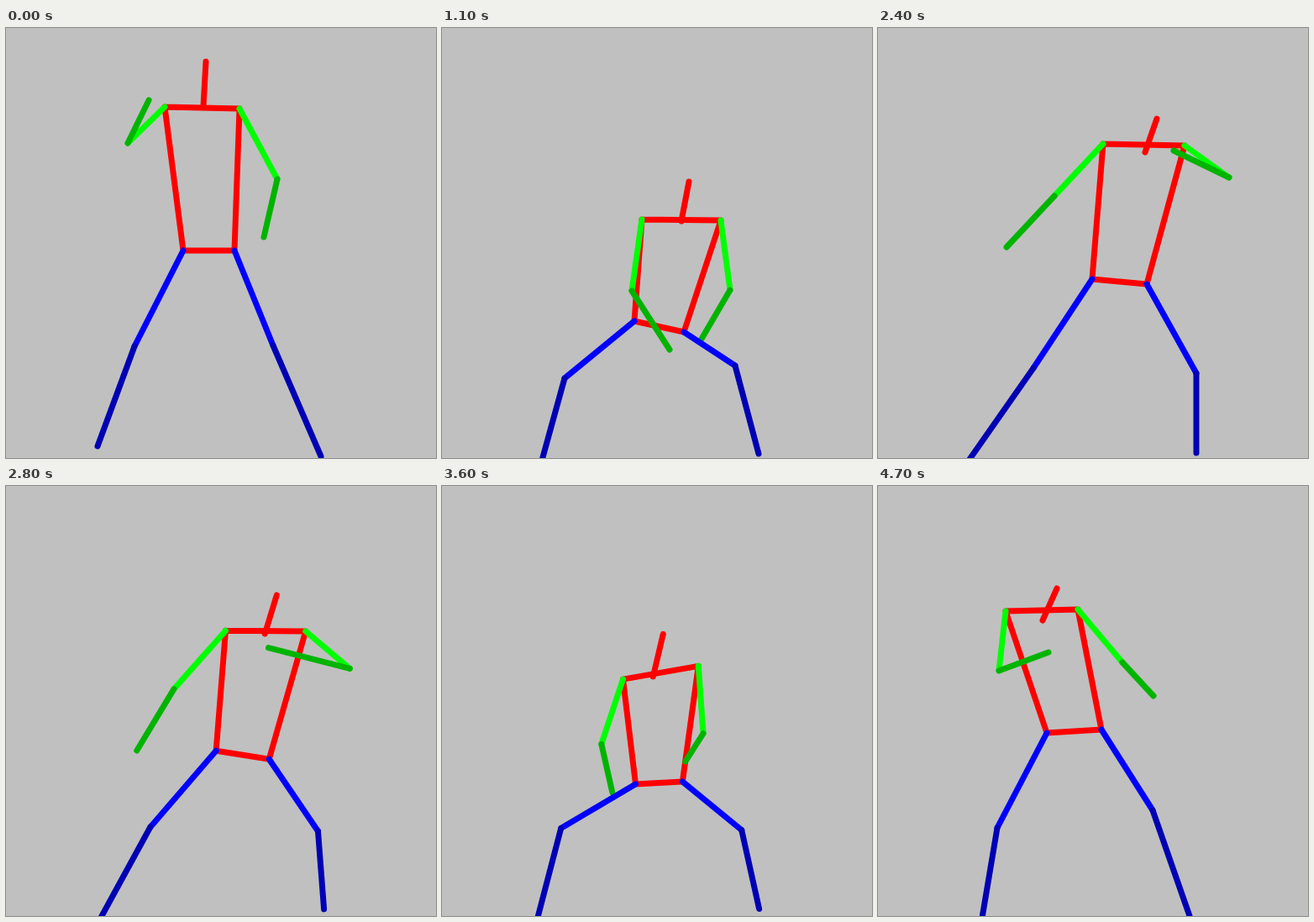
An HTML page with a canvas for the animation above (4.8 s loop, 512 by 512 pixels).

```html
<!DOCTYPE html>
<html lang="en">
<head>
<meta charset="utf-8">
<title>Dancing stick figure</title>
<style>
  html, body { margin: 0; width: 100%; height: 100%; overflow: hidden; background: #c0c0c0; }
  canvas { display: block; }
</style>
</head>
<body>
<canvas id="stage" width="512" height="512"></canvas>
<script>
const ctx = document.getElementById('stage').getContext('2d');
const LOOP = 4800, STEP = 100;
const TIMES = [0, 1100, 1900, 2400, 3200, 4100, 4700];

// Smooth curve through the keys that never overshoots them; flat at both ends.
function curve(times, values) {
  const last = times.length - 1;
  const secant = i => i < 0 || i >= last ? 0 : (values[i + 1] - values[i]) / (times[i + 1] - times[i]);
  const slope = i => {
    const a = secant(i - 1), b = secant(i);
    return a * b > 0 ? 2 * a * b / (a + b) : 0;
  };
  return t => {
    if (t >= times[last]) return values[last];
    const i = times.findIndex(k => k > t) - 1;
    const span = times[i + 1] - times[i], u = (t - times[i]) / span, v = 1 - u;
    return values[i] * v * v * (1 + 2 * u) + values[i + 1] * u * u * (3 - 2 * u)
      + span * u * v * (slope(i) * v - slope(i + 1) * u);
  };
}

// A joint has one x,y pair per key time, plus optional keys in between.
function joint(xy, extra = {}) {
  const keys = { ...extra };
  TIMES.forEach((t, i) => keys[t] = xy.slice(2 * i, 2 * i + 2));
  const times = Object.keys(keys).map(Number), points = Object.values(keys);
  const x = curve(times, points.map(p => p[0]));
  const y = curve(times, points.map(p => p[1]));
  return t => [x(t), y(t)];
}

const head = joint([238,40, 294,183, 325,125, 332,108, 302,160, 220,187, 213,122]);
const neck = joint([235,93, 285,230, 311,155, 318,148, 288,212, 208,236, 196,160]);
const shoulderL = joint([189,94, 238,228, 264,148, 268,138, 247,215, 172,239, 152,149]);
const shoulderR = joint([278,96, 332,229, 362,165, 365,140, 339,209, 260,217, 238,147]);
const hipL = joint([211,265, 229,349, 251,302, 255,299, 241,339, 216,366, 201,294]);
const hipR = joint([272,265, 288,362, 316,312, 320,305, 301,348, 271,354, 266,290]);
const elbowL = joint([145,137, 226,313, 218,224, 210,200, 192,292, 187,316, 144,220]);
const elbowR = joint([323,180, 343,312, 397,197, 418,178, 349,276, 285,305, 291,210],
  { 1700: [403, 214], 2200: [426, 182], 2600: [425, 190] });
const handL = joint([170,86, 271,383, 178,267, 153,261, 163,369, 252,350, 203,198]);
const handR = joint([307,249, 308,372, 339,191, 352,146, 273,266, 319,375, 328,250]);
const kneeL = joint([153,379, 146,417, 181,401, 185,405, 153,407, 134,408, 142,407]);
const kneeR = joint([318,378, 349,402, 374,404, 379,411, 361,411, 351,405, 327,386]);
const footL = joint([109,498, 117,522, 103,505, 108,515, 112,520, 112,522, 123,520],
  { 1500: [98, 506] });
const footR = joint([375,510, 377,507, 372,516, 379,506, 378,503, 377,505, 371,512]);

const bones = [
  ['#f00', head, neck],
  ['#f00', shoulderL, shoulderR, hipR, hipL, shoulderL],
  ['#0f0', shoulderL, elbowL],
  ['#00b400', elbowL, handL],
  ['#0f0', shoulderR, elbowR],
  ['#00b400', elbowR, handR],
  ['#00f', hipL, kneeL],
  ['#0000b4', kneeL, footL],
  ['#00f', hipR, kneeR],
  ['#0000b4', kneeR, footR]
];

ctx.lineWidth = 7;
ctx.lineCap = ctx.lineJoin = 'round';

function draw() {
  const t = Math.floor(performance.now() % LOOP / STEP) * STEP;
  ctx.fillStyle = '#c0c0c0';
  ctx.fillRect(0, 0, 512, 512);
  for (const [color, ...joints] of bones) {
    ctx.strokeStyle = color;
    ctx.beginPath();
    for (const at of joints) ctx.lineTo(...at(t));
    ctx.stroke();
  }
  requestAnimationFrame(draw);
}
draw();
</script>
</body>
</html>
```
